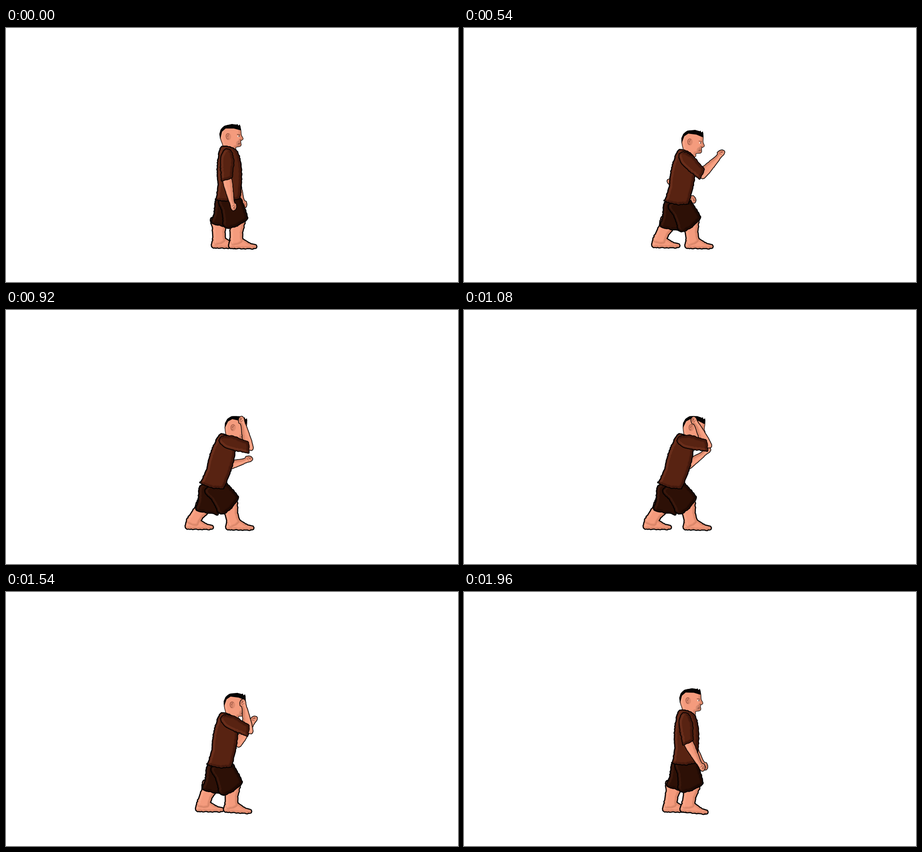
Animation of 998x561 px, one loop 2 s. Source, as an HTML page with a canvas:

```html
<!DOCTYPE html>
<html lang="en">
<head>
<meta charset="utf-8">
<title>Guard stance</title>
<style>
html, body { margin: 0; width: 100%; height: 100%; overflow: hidden; background: #fff; }
canvas { display: block; }
</style>
</head>
<body>
<canvas id="stage" width="998" height="561"></canvas>
<script>
const ctx = document.getElementById('stage').getContext('2d');
const LOOP = 2000, STEPS = 48, HALF = STEPS / 2, BEAT = STEPS / 4;

// Joints in the rest pose
const NECK = [478, 261], HEAD = [496, 240], SHOULDER = [486, 277], ELBOW = [488, 334],
  HIP = [490, 380], KNEE = [515, 425], ANKLE = [509, 470], KNEE2 = [475, 425], ANKLE2 = [471, 469];

const SKIN = { fill: '#f49b7d', light: '#ffb092', dark: '#a95f49', shade: .2, ink: 3, rough: .4 };
const LEG = { ...SKIN, ink: 5, rough: .8 };
const SHIRT = { fill: '#582312', light: '#7c3b24', dark: '#2c0f07', shade: .32, ink: 4.6, rough: .9 };
const SHORTS = { ...SHIRT, fill: '#2d1006', light: '#4b2012', dark: '#120502' };

let seed = 7;
const random = () => (seed = seed * 16807 % 2147483647) / 2147483647;

// Smooth closed shape through "x,y x,y ..." with a ragged edge; a doubled point makes a corner
function shape(text, look) {
  const p = text.split(' ').map(s => s.split(',').map(Number)), path = new Path2D();
  const jag = v => v + (random() - .5) * 2 * look.rough;
  p.forEach((b, i) => {
    const [a, c, d] = [-1, 1, 2].map(k => p[(i + k + p.length) % p.length]);
    const count = Math.ceil(Math.hypot(c[0] - b[0], c[1] - b[1]) / 3);
    for (let k = 0; k < count; k++) {
      const u = k / count;
      const spline = j => b[j] + u / 2 * (c[j] - a[j] + u * (2 * a[j] - 5 * b[j] + 4 * c[j] - d[j]
        + u * (3 * b[j] - a[j] - 3 * c[j] + d[j])));
      path.lineTo(jag(spline(0)), jag(spline(1)));
    }
  });
  path.closePath();
  return { path, ...look };
}

const head = shape('479,258 473,238 479,220 500,214 516,219 519,236 523,245 518,249 518,260 507,263 506,271 483,266', { ...SKIN, ink: 2.4, rough: .2 });
const torso = shape('479,262 470,282 467,318 469,350 464,379 464,379 491,381 516,376 516,376 519,322 514,284 505,269', SHIRT);
const sleeve = shape('486,268 475,283 474,305 477,337 477,337 499,330 499,330 502,296 497,273', { ...SHIRT, ink: 3.6 });
const forearm = shape('478,333 490,375 495,388 498,400 503,403 508,398 508,389 503,383 498,335 488,329', SKIN);
const shorts = shape('470,380 478,405 481,435 490,441 510,436 533,421 533,421 528,404 515,375 492,374', SHORTS);
const shorts2 = shape('467,376 461,405 455,428 463,433 490,438 504,437 508,378', SHORTS);
const shin = shape('495,420 496,445 498,478 521,474 521,455 525,422', LEG);
const foot = shape('498,468 493,477 495,485 520,486 549,486 551,480 537,476 520,466', LEG);
const hair = new Path2D('M473 246L471 234L474 224L482 216L499 212L508 214L511 212L513 216L516 213L518 218L518 226L503 222L485 222L477 229Z');
const knuckles = new Path2D('M499 394L504 391M501 398L506 394M505 400L503 396');

const rad = deg => deg * Math.PI / 180;
const angle = (a, b) => Math.atan2(b[1] - a[1], b[0] - a[0]) * 180 / Math.PI;
const add = (p, x, y) => [p[0] + x, p[1] + y];

// Where rest point q lands when pivot sits at pos, turned by deg
function turn(pos, pivot, q, deg) {
  const x = q[0] - pivot[0], y = q[1] - pivot[1], c = Math.cos(rad(deg)), s = Math.sin(rad(deg));
  return add(pos, x * c - y * s, x * s + y * c);
}

function within(pos, pivot, deg, scale, paint) {
  ctx.save();
  ctx.translate(...pos);
  ctx.rotate(rad(deg));
  ctx.scale(scale, scale);
  ctx.translate(-pivot[0], -pivot[1]);
  paint();
  ctx.restore();
}

function line(path, color, width, alpha = 1) {
  ctx.globalAlpha = alpha;
  ctx.strokeStyle = color;
  ctx.lineWidth = width;
  ctx.stroke(path);
  ctx.globalAlpha = 1;
}

const outline = ({ path, ink }) => line(path, '#050202', ink);

function body({ path, fill, light, dark, shade }) {
  ctx.fillStyle = fill;
  ctx.fill(path);
  ctx.clip(path);
  ctx.translate(3, 1);
  line(path, light, 5, .5);
  ctx.translate(-5, -2);
  line(path, dark, 7, shade);
  line(path, dark, 3, shade);
}

// Each part: [shape, position, pivot, angle, scale]; a group shares one outline
function draw(...parts) {
  for (const paint of [outline, body])
    for (const [s, pos, pivot, deg, scale = 1] of parts)
      within(pos, pivot, deg, scale, () => paint(s));
}

function oval(x, y, rx, ry, color, alpha = 1) {
  ctx.globalAlpha = alpha;
  ctx.fillStyle = color;
  ctx.beginPath();
  ctx.ellipse(x, y, rx, ry, 0, 0, 7);
  ctx.fill();
  ctx.globalAlpha = 1;
}

const ear = new Path2D('M493 235C489 231 485 235 486 240C487 245 490 247 492 244M492 237C489 236 488 240 491 241');
const features = new Path2D('M510 235L517 236M516 247L520 248M512 256L517 255');

function face() {
  oval(491, 240, 6, 8, '#9c5844', .25);
  oval(513, 255, 5, 6, '#6b4a42', .22);
  line(ear, '#8a4a38', 1.3, .8);
  line(features, '#4d2a20', 1.3, .75);
  oval(513.5, 239, 2.4, 1.5, '#fff', .9);
  oval(514.5, 239, 1, 1.4, '#20100c');
  ctx.fillStyle = '#050202';
  ctx.fill(hair);
}

function arm(shoulder, upper, lower, size) {
  const elbow = turn(shoulder, SHOULDER, ELBOW, upper);
  draw([forearm, elbow, ELBOW, lower]);
  within(elbow, ELBOW, lower, 1, () => line(knuckles, '#4d2018', 1, .7));
  draw([sleeve, shoulder, SHOULDER, upper, size]);
}

// The shin follows from where the knee and the foot are
function leg(thigh, hip, deg, knee, ankle, tilt) {
  const bend = angle(turn(hip, HIP, knee, deg), ankle) - angle(KNEE, ANKLE);
  draw([foot, ankle, ANKLE, tilt], [shin, ankle, ANKLE, bend]);
  draw([thigh, hip, HIP, deg]);
}

function render(step) {
  // One straight move per beat through five poses
  const beat = Math.floor(step / BEAT), u = step / BEAT - beat;
  const through = (...v) => v[beat] + (v[beat + 1] - v[beat]) * u;

  // The body sinks in the first half and rises, drifting back, in the second
  const back = Math.max(0, step / HALF - 1);
  const sink = back ? 1 - .94 * back : step / HALF;

  const lean = 18.4 * sink;
  const neck = add(NECK, -sink, 13 * sink - 2 * back);
  const shoulder = turn(neck, NECK, SHOULDER, lean);
  const hip = turn(neck, NECK, HIP, lean);
  const skull = add(HEAD, 10.5 * Math.sin(sink * Math.PI / 2) + 2.5 * back, 23 * sink - 2 * back);
  const nod = 14 * sink;
  const ankle = add(ANKLE, -14 * step / STEPS, -2 * sink ** 4);
  const ankle2 = add(ANKLE2, through(0, -37, -62, -37, -13), -2 * sink);

  ctx.fillStyle = '#fff';
  ctx.fillRect(0, 0, 998, 561);
  ctx.lineJoin = 'round';

  arm(shoulder, through(-17, 29, 1, -30, -9), through(-6, -28, -107, -143, -8), .7);
  leg(shorts2, hip, 3 * back - 2 * sink, KNEE2, ankle2, 0);
  leg(shorts, add(hip, 4 * sink, 2 * sink), 6 * back - 24 * sink, KNEE, ankle, 5 * back);
  draw([head, skull, HEAD, nod]);
  within(skull, HEAD, nod, 1, face);
  draw([torso, neck, NECK, lean]);
  arm(shoulder, through(0, -44, -81, -70, -2), through(0, -118, -194, -194, 0), 1);
}

const start = performance.now();
let shown = -1;
function tick() {
  const t = Math.max(0, performance.now() - start) % LOOP;
  const step = Math.floor((t + 5) * STEPS / LOOP) % STEPS;
  if (step !== shown) render(shown = step);
  requestAnimationFrame(tick);
}
tick();
</script>
</body>
</html>
```
